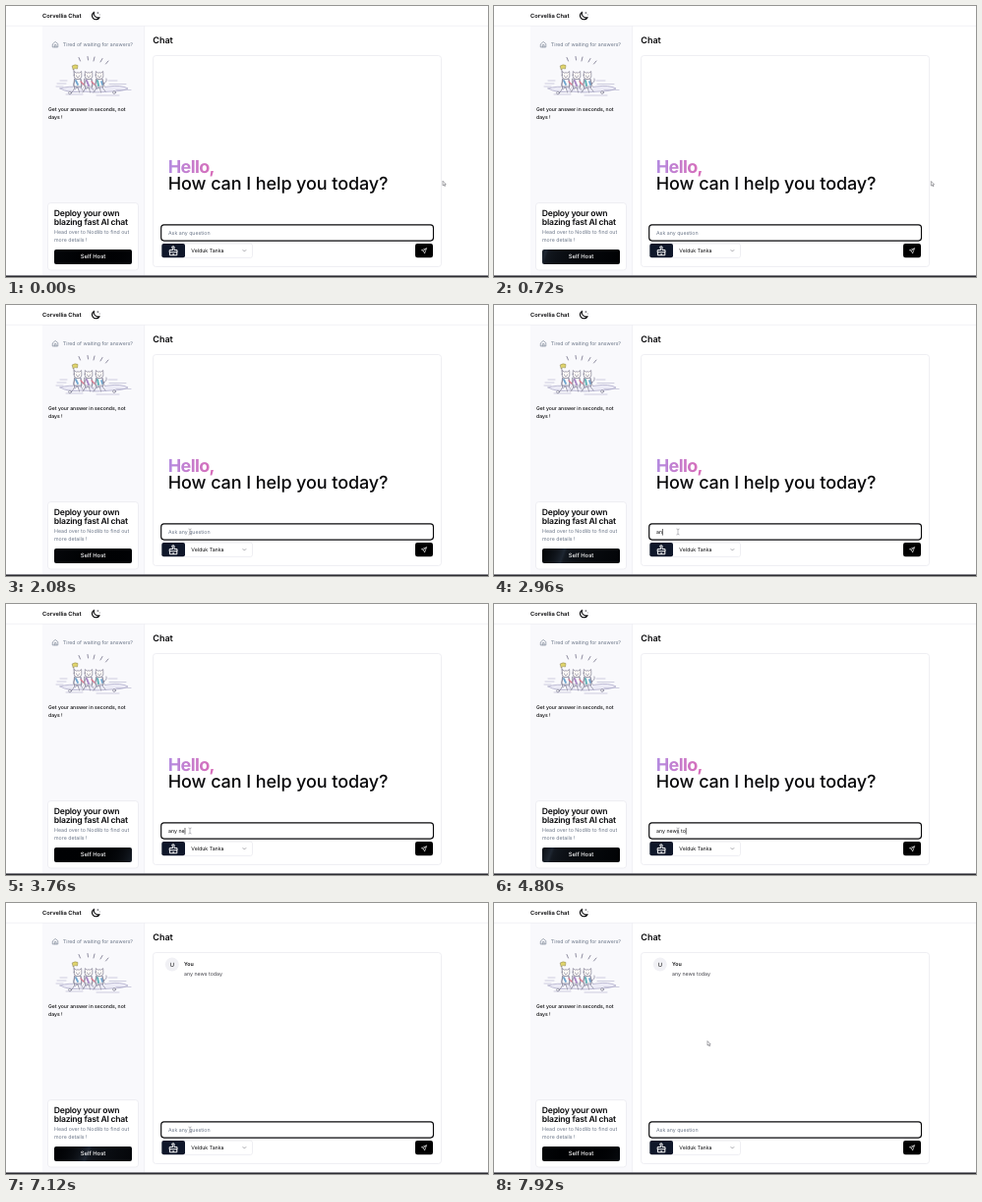
Write an HTML page that moves like this. It is 490x276 px and loops after 8 s.

```html
<!DOCTYPE html>
<html lang="en">
<head>
<meta charset="utf-8">
<title>Chat</title>
<style>
  html, body { margin: 0; width: 100%; height: 100%; overflow: hidden; background: #fff; }
  svg { display: block; width: 100vw; height: 100vh; }
  text { font: 400 5.25px Inter, sans-serif; fill: #09090b; text-rendering: geometricPrecision; white-space: pre; }
  .muted { fill: #6b7688; }
  .medium { font-weight: 500; }
  .bold { font-weight: 600; }
  .promo { font-size: 8.6px; font-weight: 600; letter-spacing: -.026em; }
  .hero { font-size: 18px; font-weight: 500; letter-spacing: -.005em; }
  .hello { font-weight: 700; letter-spacing: -.036em; fill: url(#pink); }
  .box { fill: #fff; stroke: #e8e8ee; stroke-width: .7; }
  .line { fill: none; stroke-linecap: round; stroke-linejoin: round; }
  #shimmer {
    height: 15px; border-radius: 2px;
    background: linear-gradient(110deg, #000103, 45%, #1e2631, 55%, #000103) 0 0 / 200% 100%;
  }
</style>
</head>
<body>
<svg viewBox="0 0 490 276">
  <defs>
    <linearGradient id="pink">
      <stop offset="0" stop-color="#b48be0"/>
      <stop offset="1" stop-color="#d86cb8"/>
    </linearGradient>
    <g id="cat">
      <path d="M-3 4Q-5 9-3.5 13L-6 17M3 4Q5 8 3.5 12.5L6 16M-3 13.5L0 12L1.5 17" fill="#fff"/>
      <path d="M-3.8-.8L-3.7-4.4L-1.6-2.9Q0-3.5 1.6-2.9L3.7-4.4L3.8-.8Q4.4 3.4 0 3.6Q-4.4 3.4-3.8-.8Z" fill="#fdfaf6"/>
      <path d="M-1.5 0V.4M1.5 0V.4M-.7 1.6Q0 2.2 .7 1.6"/>
    </g>
  </defs>

  <!-- header and sidebar -->
  <rect x="37" y="20" width="104" height="254" fill="#f9f9fc"/>
  <path d="M0 20.3H490M140.6 20V274" stroke="#eeeef2" stroke-width=".7"/>
  <text class="bold" x="37" y="12.2" style="font-size:5.8px">Corvellia Chat</text>
  <path class="line" d="M89.6 6.2A4 4 0 1 0 95 11.6A4.2 4.2 0 0 1 89.6 6.2Z" fill="#09090b" stroke="#09090b" stroke-width="1.2"/>
  <path class="line" d="M89.6 6.2A4 4 0 0 0 95 11.6" stroke="#fff" stroke-width=".5" opacity=".3"/>
  <path class="line" d="M93.4 6.3V7.7M92.7 7H94.1M95.3 8.8V9.1" stroke="#3f3f46" stroke-width=".5"/>
  <path class="line" d="M47.6 38.6L50.2 36.4L52.8 38.6V41.9H47.6ZM49.3 41.8V39.6H51.1V41.8" stroke="#6b7688" stroke-width=".6"/>
  <text class="muted" x="57.8" y="41" style="font-size:5.2px">Tired of waiting for answers?</text>

  <!-- running cats -->
  <g class="line" stroke="#5f5c78" stroke-width=".55">
    <path d="M74 52.5L75.5 56M83 51.5L83.5 55M90 52L89 56M98 53.5L96 57M104 56L101.5 59" stroke-width=".7"/>
    <path d="M55 84Q64 81 76 83T104 82Q117 80 124 84Q119 87 107 87Q92 89 78 87Q63 89 55 84Z" fill="#ecebf6" stroke="#9592b8"/>
    <path d="M52 79H61M51 82H58M55 76H62M104 76H113M105 79.5H122M112 85.5H127M61 90H78M92 91H115" stroke="#aaa7c6"/>
    <path d="M68 61L71 77"/>
    <path d="M67.5 61Q70 59 73 60.5L72.5 64Q70.5 62.8 68.4 64.6Z" fill="#e0d46a" stroke="#8f8850"/>
    <path d="M70 74H76L77 82H69ZM80 74H87L88 82H80ZM92 74H98L100 82H91Z" fill="#fbfafc"/>
    <path d="M71 76L73 80M97 77L98 80" stroke="#6fa6cf" stroke-width="1.8"/>
    <path d="M82 76L84 81" stroke="#a988c6" stroke-width="2"/>
    <path d="M93 76L94 81" stroke="#62b3b8" stroke-width="2"/>
    <use href="#cat" x="73" y="71"/>
    <use href="#cat" x="84" y="71"/>
    <use href="#cat" x="95" y="71"/>
    <path d="M76 77L79 80M87 77L90 80" stroke="#d9798f" stroke-width="1.2"/>
    <path d="M99 79Q103 78 102 74"/>
    <circle cx="65" cy="88.5" r="1.4" fill="#fff"/>
    <circle cx="110" cy="88" r="1.4" fill="#fff"/>
  </g>

  <text class="medium" y="107" style="font-size:5.1px"><tspan x="43">Get your answer in seconds, not</tspan><tspan x="43" dy="7.6">days !</tspan></text>

  <rect class="box" x="42.5" y="200.5" width="92" height="68.5" rx="3"/>
  <text class="promo" x="48.8" y="214.3">Deploy your own</text>
  <text class="promo" x="48.8" y="223.2">blazing fast AI chat</text>
  <text class="muted" x="49" y="232.2">Head over to Nodlib to find out</text>
  <text class="muted" x="49" y="239.7">more details !</text>
  <foreignObject x="49" y="247.5" width="79" height="15"><div id="shimmer"></div></foreignObject>
  <text class="medium" x="88.5" y="257.1" text-anchor="middle" style="font-size:5.9px;fill:#fff">Self Host</text>

  <!-- chat panel -->
  <text class="bold" x="149.3" y="38.3" style="font-size:9px">Chat</text>
  <rect class="box" x="149.5" y="50.5" width="293" height="215" rx="3"/>
  <g id="welcome">
    <text class="hero hello" x="164.8" y="169.8">Hello,</text>
    <text class="hero" x="164.8" y="187">How can I help you today?</text>
  </g>
  <g id="message">
    <circle cx="168.8" cy="62.6" r="7" fill="#f1f1f5"/>
    <text x="168.8" y="64.7" text-anchor="middle" style="font-size:5.8px">U</text>
    <text class="bold" x="181" y="64.4">You</text>
    <text x="181" y="74.4" style="fill:#3f3f46">any news today</text>
  </g>

  <rect x="157.7" y="222.9" width="276.8" height="16.2" rx="3" fill="#fff" stroke="#09090b" stroke-width="1.15"/>
  <text id="field" x="165" y="233.2"></text>
  <path id="caret" d="M0 228V234.6" stroke="#09090b" stroke-width=".6"/>

  <rect class="box" x="180" y="242" width="70.5" height="14.4" rx="2"/>
  <rect x="158.3" y="242" width="23.7" height="14.2" rx="2" fill="#0f172a"/>
  <path class="line" d="M169.2 245H171V248.6H174V250.8H166.2V248.6H169.2ZM166.4 250.8V253.8H173.8V250.8M170.1 253.6V252.4" stroke="#fff" stroke-width="1"/>
  <text x="188.3" y="251.3">Velduk Tanka</text>
  <path class="line" d="M240.9 248.5L242.4 250L243.9 248.5" stroke="#71717a" stroke-width=".6"/>
  <rect x="416" y="242" width="18" height="14.2" rx="2.2"/>
  <path class="line" d="M427.2 246.9L422.4 248.7L424.5 249.6L425.4 251.7ZM424.5 249.6L427.2 246.9" stroke="#fff" stroke-width=".6"/>

  <rect y="274" width="490" height="2" fill="#8a8a90"/>
  <rect y="275" width="490" height="1" fill="#2b2b30"/>

  <g id="pointer">
    <path id="arrow" d="M0 0V4.6L1.1 3.7L1.8 5.3L2.6 5L1.9 3.4H3.2Z" fill="#fff" stroke="#52525b" stroke-width=".5"/>
    <path id="beam" class="line" d="M-1.2-3Q0-3 0-2.2V2.2Q0 3-1.2 3M1.2-3Q0-3 0-2.2M0 2.2Q0 3 1.2 3" stroke="#71717a" stroke-width=".45"/>
  </g>
</svg>
<script>
  const LOOP = 8000, SEND = 5840, SHIMMER = 2000;
  const query = 'any news today';
  const keys = [2800, 2920, 3100, 3300, 3520, 3700, 3900, 4080, 4300, 4540, 4720, 4920, 5080, 5240];
  // time, x, y
  const route = [
    [0, 444, 178.2], [500, 444.6, 178.6], [960, 444, 178.4], [1280, 439, 181],
    [1740, 187, 231], [7340, 187, 231], [7740, 217, 140.5], [LOOP, 217, 140.5]
  ];
  const el = id => document.getElementById(id);
  const show = (id, on) => { el(id).style.display = on ? '' : 'none'; };

  function pointerAt(t) {
    const i = route.findIndex(p => p[0] > t);
    const [t0, x0, y0] = route[i - 1], [t1, x1, y1] = route[i];
    const u = (t - t0) / (t1 - t0), k = u * u * (3 - 2 * u);
    return [x0 + (x1 - x0) * k, y0 + (y1 - y0) * k];
  }

  function draw(now) {
    const t = now % LOOP, sent = t >= SEND;
    show('welcome', !sent);
    show('message', sent);

    const sweep = (t + 300) % SHIMMER / SHIMMER;
    el('shimmer').style.backgroundPosition = `${-200 * sweep}% 0`;

    const typed = sent ? 0 : keys.filter(k => k <= t).length;
    const field = el('field');
    field.textContent = typed ? query.slice(0, typed) : 'Ask any question';
    field.setAttribute('class', typed ? '' : 'muted');

    const caretOn = typed > 0 && t - keys[typed - 1] < 500;
    show('caret', caretOn);
    if (caretOn) {
      const x = 165.4 + field.getComputedTextLength();
      el('caret').setAttribute('transform', `translate(${x})`);
    }

    const [x, y] = pointerAt(t), overField = y > 223 && y < 239;
    el('pointer').setAttribute('transform', `translate(${x} ${y})`);
    show('arrow', !overField);
    show('beam', overField);
  }

  const start = performance.now();
  function tick() {
    draw(performance.now() - start);
    requestAnimationFrame(tick);
  }
  tick();
</script>
</body>
</html>
```
